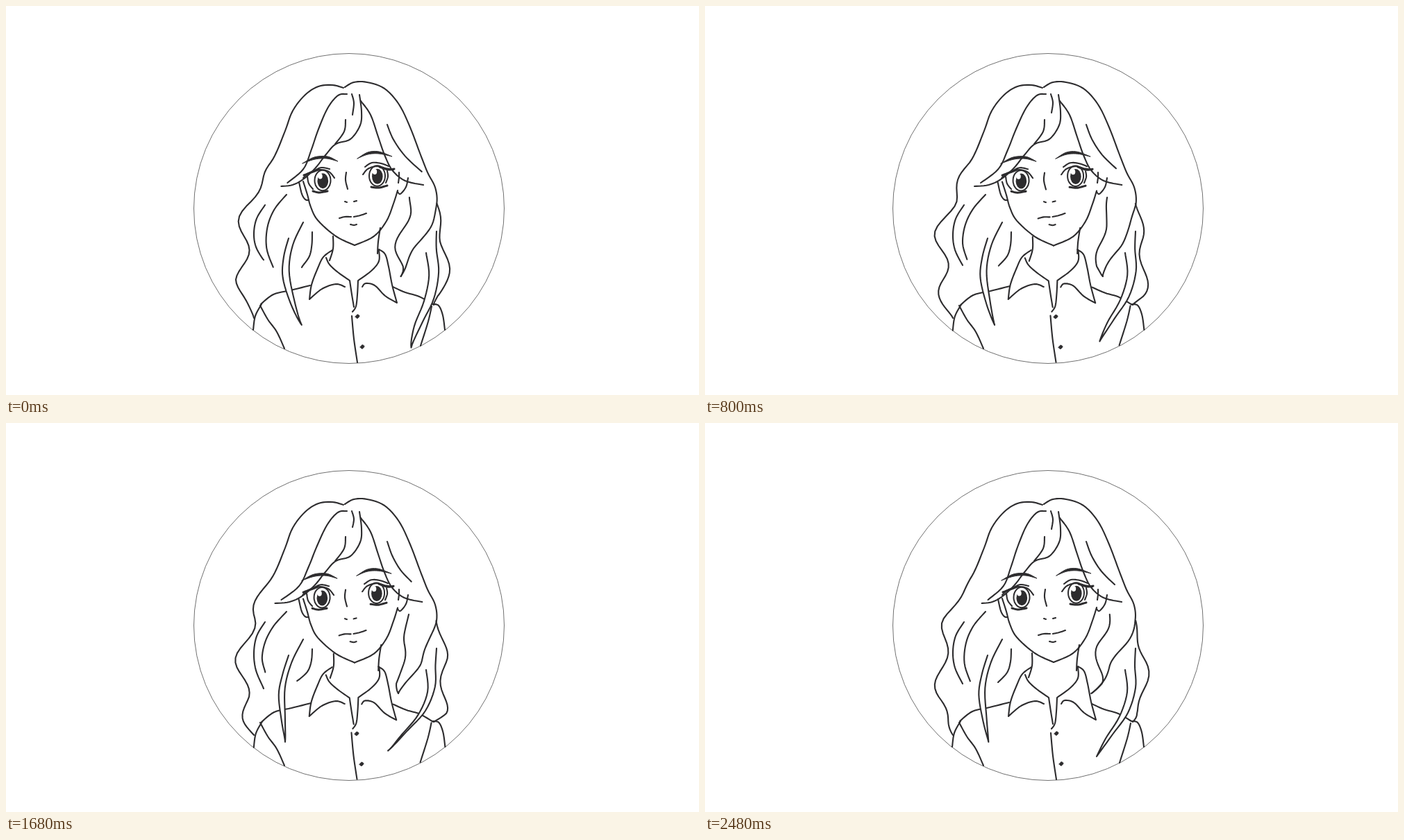
Animation, 998 px wide and 561 px high, one loop 2.56 s. Source, as an HTML page:

```html
<!DOCTYPE html>
<html lang="en">
<head>
<meta charset="utf-8">
<title>Portrait</title>
<style>
  html, body { margin: 0; width: 100%; height: 100%; overflow: hidden; background: #fff; }
  svg { display: block; width: 100%; height: 100%; }
  path { fill: none; stroke: #2d2c2e; stroke-width: 2.1; stroke-linecap: round; stroke-linejoin: round; }
  .lock { fill: #fff; }
  .ink { fill: #2d2c2e; stroke-width: 1; }
  .thick { stroke-width: 3; }
  ellipse { fill: #2d2c2e; }
  .iris { fill: #fff; stroke: #2d2c2e; stroke-width: 2; }
  .shine { fill: #fff; }
  .frame { fill: none; stroke: #333; stroke-width: .7; }
</style>
</head>
<body>
<svg viewBox="0 0 998 561">
  <circle class="frame" cx="494" cy="292" r="223.5"/>
  <g id="body"></g>
  <g id="face"></g>
  <g id="hair"></g>
</svg>
<script>
const STEP = 80, FRAMES = 32, CYCLE = 8, WAVE = 93, TAU = Math.PI * 2;
const $ = id => document.getElementById(id);
const clamp = v => Math.max(0, Math.min(1, v));

// Smooth curve through the points, sampled; "/" makes a sharp corner.
function sample(text, per = 6) {
  const out = [];
  for (const part of text.split('/')) {
    const p = part.trim().split(/\s+/).map(s => s.split(',').map(Number));
    if (out.length) p.unshift(out.pop());
    for (let i = 0; i < p.length - 1; i++) {
      const a = p[i - 1] || p[i], b = p[i], c = p[i + 1], d = p[i + 2] || c;
      for (let s = 0; s < per; s++) {
        const k = s / per;
        out.push(b.map((v, j) => v + k / 2 * (c[j] - a[j] +
          k * (2 * a[j] - 5 * v + 4 * c[j] - d[j] + k * (3 * (v - c[j]) + d[j] - a[j])))));
      }
    }
    out.push(p[p.length - 1]);
  }
  return out;
}

const line = points => 'M' + points.map(p => p.map(v => v.toFixed(2))).join('L');

function add(group, tag, attrs) {
  const el = document.createElementNS('http://www.w3.org/2000/svg', tag);
  for (const k in attrs) el.setAttribute(k, attrs[k]);
  return $(group).appendChild(el);
}

const feature = (text, cls = '', group = 'face') =>
  add(group, 'path', { d: line(sample(text)), class: cls });

// A line of the figure and how far it shifts when leaning.
const limbs = [];
function limb(text, dx, dy, cls) {
  limbs.push({ el: feature(text, cls, 'body'), dx, dy });
}

// A hair line: a wave runs down it, its free end swings.
const strands = [];
function strand(text, { amp = 0, at = 0, from = 0, swing = 0, lift = 0, lag = 0, pow = 2 }, back) {
  const el = add('hair', 'path', { class: back ? 'lock' : '' });
  const sides = [text, back].filter(Boolean).map(s => sample(s));
  const bend = (points, phase) => points.map(([x, y], i) => {
    const t = i / (points.length - 1);
    const wave = amp * clamp((y - from) / 60) * clamp((1 - t) * 6) * Math.cos(TAU * (y - 285 - at) / WAVE - phase);
    const tip = t ** pow * Math.sin(phase - lag);
    return [x + wave + swing * tip, y + lift * tip];
  });
  strands.push(phase => {
    const [a, b = []] = sides.map(s => bend(s, phase));
    el.setAttribute('d', line([...a, ...b.reverse()]));
  });
}

// Head
limb('428,253 434,272 439,290 449,309 475,332 502,345', 0, 1.5);
limb('564,266 558,285 548,310 530,332 502,345', 0, 1.5);
limb('422,254 426,271 431,279 436,280', -1, 0);
limb('579,248 576,261 568,271 564,268', 0, 0);
limb('566,240 566,247 565,255', 0, 0);
limb('490,240 489,251 492,264', -2.5, 1.5);
limb('488,282 491,283', 0, .5);
limb('501,282 505,281', -1, 1);
limb('480,306 488,304 497,304', -1, 1);
limb('501,304 510,302 519,299', -1, 0);
limb('496,315 501,316 505,315', -1, .5);

// Neck and shirt
limb('471,332 471,350 466,367', 2, 2);
limb('539,320 536,340 535,357', 3, 0);
limb('470,352 457,362 449,378 440,402 437,423 / 455,408 475,401 488,405', -.7, 0);
limb('461,363 466,373 478,384 495,396 / 498,416 501,434', -.7, 1);
limb('537,351 546,358 551,376 556,402 563,428 / 546,418 531,403 518,400 513,405', -2, 1);
limb('537,352 537,368 526,382 507,396 / 506,416 504,433 499,441', 1, -.5);
limb('498,447 501,480 506,514', -1.3, -1);
limb('367,430 385,416 410,410 438,403', 3, 2.5);
limb('557,405 575,413 595,419 614,430', 1.5, 1.5);
limb('368,430 359,447 356,467', 2, 2);
limb('366,432 377,452 390,470 401,494', 0, 0);
limb('614,430 623,432 629,446 632,467', 1, 0);
limb('613,433 608,455 597,490', -1, -2);
for (const [x, y] of [[506, 447.7], [513, 491.5]])
  limb(`${x - 3},${y + .5} ${x},${y - 2.7} ${x + 3},${y - .7} ${x},${y + 2.7} ${x - 3},${y + .5}`, -2.5, 1, 'ink');

// Eyes and brows
function eye(x, y) {
  const oval = (dx, dy, rx, ry, cls) => add('face', 'ellipse', { cx: x + dx, cy: y + dy, rx, ry, class: cls });
  oval(0, 0, 11.5, 14.8, 'iris');
  oval(.3, .8, 7.8, 11, '');
  oval(-3.5, -6, 3.2, 4, 'shine');
}
eye(456, 251.5);
eye(534.5, 245);
feature('427,227 444,218 463,217 478,224 / 462,220 445,221 427,227', 'ink');
feature('506,220 521,211 537,210 556,217 / 537,213 521,214 506,220', 'ink');
feature('428,248 436,241 451,236 465,239 473,248');
feature('429,244 437,241 450,236', 'thick');
feature('443,238 454,233 466,235');
feature('434,246 436,256 442,264');
feature('442,267 451,269 463,267', 'thick');
feature('514,243 521,235 534,231 547,234 558,236');
feature('538,232 550,236 559,235', 'thick');
feature('517,232 527,226 540,227 551,231');
feature('549,238 550,246 547,255');
feature('526,261 537,262 549,259', 'thick');

// Outlines and the right inner lock
strand('486,118 470,114 450,116 431,128 413,151 402,180 387,216 369,245 353,282 341,325 341,365 341,400 346,430 357,450',
  { amp: -10, from: 225 });
strand('488,117 501,110 520,110 545,119 566,142 582,175 596,212 607,240 618,262 620,285 612,311 598,335 586,357 574,376 564,390',
  { amp: 6, at: 8, from: 285, swing: 10, lag: .87, pow: 6 });
strand('581,276 579,297 571,322 567,348 568,372 564,390', { amp: 7, at: -5, from: 260, swing: 10, lag: .87, pow: 6 });
strand('620,285 627,315 632,345 632,385 629,415 616,431', { amp: 7, at: -17, from: 280 });

// Fringe
strand('491,127 478,129 463,147 449,178 438,208 426,235 402,255', { swing: 6, lag: -1.2 });
strand('509,128 512,152 510,172 496,192 475,199 460,215 445,234 427,250 411,258 393,260', { swing: 6, lag: -1.2, pow: 6 });
strand('489,164 487,181 474,199', {});
strand('498,127 501,139 499,153', { lift: 4 });
strand('511,137 525,157 536,189 545,215 556,237 574,252 600,258', { swing: 1 });
strand('549,171 557,192 571,214 590,233', { swing: 9, lift: 6 });

// Left inner lines
strand('373,287 361,307 357,330 360,353 371,376', { lift: -10 });
strand('404,272 386,293 375,317 372,344 379,368', { swing: 6, lift: 9, lag: -.5 });
strand('441,326 440,344 435,360 422,374', { swing: 4, lift: 3 });

// Front locks
strand('407,335 399,362 395,392 402,430 411,460', { swing: 16, lag: .17 },
  '428,312 412,345 404,382 407,425 411,460');
strand('605,356 608,388 597,423 577,455 564,481', { swing: 20, lift: 12 },
  '620,325 619,350 620,382 609,418 587,449 564,481');

function draw(now) {
  const n = Math.floor(now / STEP) % FRAMES;
  const turn = TAU * (n + 1) / CYCLE;
  const phase = turn + .8 * Math.sin(turn);
  for (const bend of strands) bend(phase);

  const lean = clamp(Math.min((n - 8) / 5, (23 - n) / 5));
  for (const { el, dx, dy } of limbs) el.setAttribute('transform', `translate(${dx * lean} ${dy * lean})`);
  $('face').setAttribute('transform', `translate(${-2.3 * lean} ${.5 * lean})`);
}

function tick() {
  draw(performance.now());
  requestAnimationFrame(tick);
}
tick();
</script>
</body>
</html>
```
